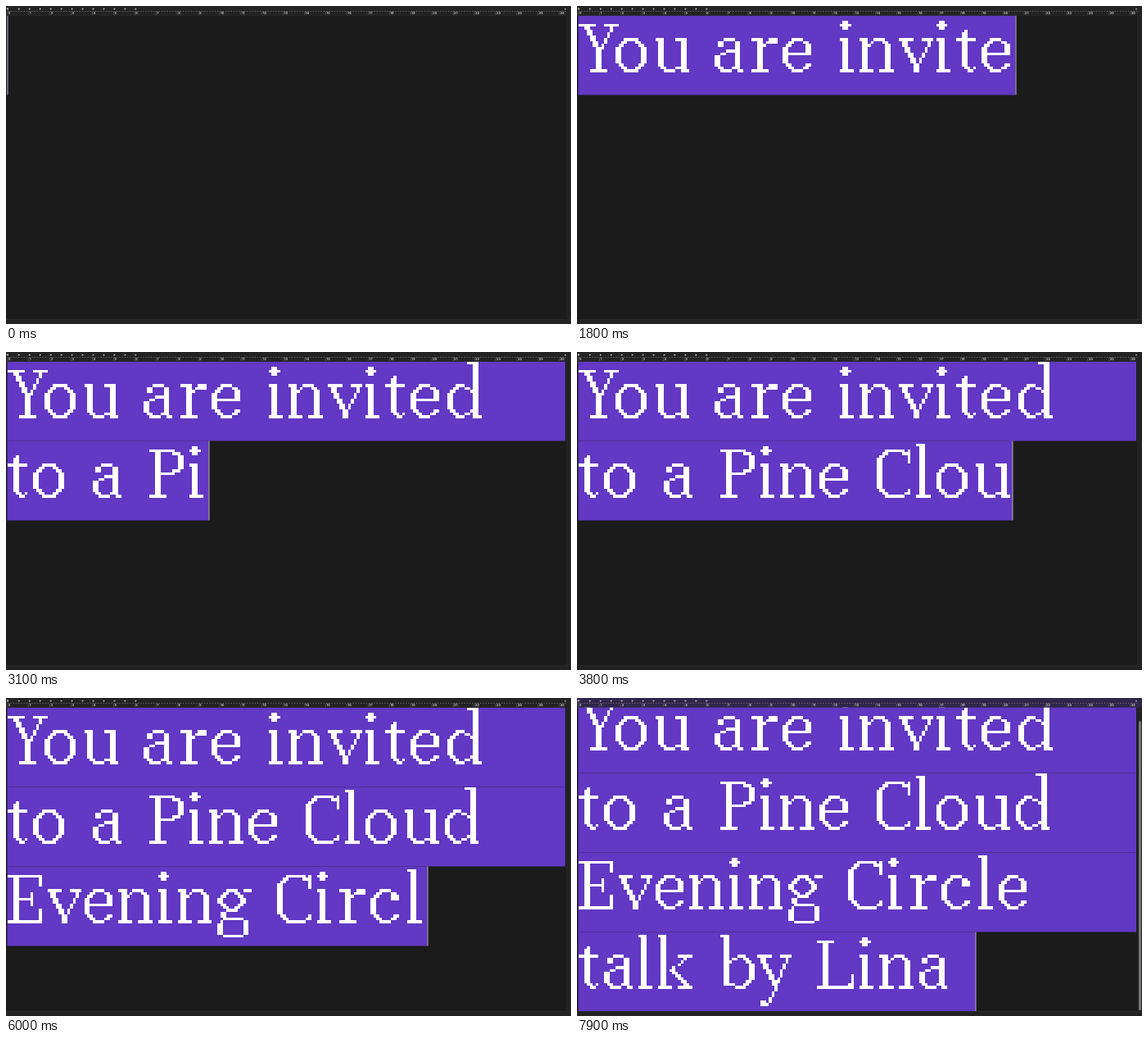
An HTML page with a canvas that plays this animation: 690x388 px, repeating every 8 s.

```html
<!DOCTYPE html>
<html lang="en">
<head>
<meta charset="utf-8">
<title>Invitation</title>
<style>
  html, body { margin: 0; width: 100%; height: 100%; overflow: hidden; background: #1b1b1b; }
  canvas { display: block; width: 690px; height: 388px; }
</style>
</head>
<body>
<canvas id="stage" width="690" height="388">You are invited to a Pine Cloud Evening Circle talk by Lina</canvas>
<script>
const ctx = document.getElementById('stage').getContext('2d');
const LOOP = 8000;
const CELL = 97 / 28;          // one font pixel
const LEFT = 2, TOP = 11.5, RIGHT = 683, BOTTOM = 382;
const LINE = 97, WRAP = 195;   // WRAP is in font pixels
const SCROLL = 17;

// Pen for the pixel font: baseline under row 19, x-height row 8, caps row 3
let cells = [];
const px = (x, y, w = 1, h = 1) => cells.push([x, y, w, h]);
const bar = (x, y, w) => px(x, y, w, 1);
const stem = (x, y0, y1) => px(x, y0, 2, y1 - y0 + 1);
const diag = (x0, y0, x1, y1, w) => {
  for (let y = y0; y <= y1; y++) bar(Math.round(x0 + (x1 - x0) * (y - y0) / (y1 - y0)), y, w);
};
const ring = (x, y, w, h, sides = 'lr') => {
  const last = y + h - 1;
  bar(x + 3, y, w - 6);
  bar(x + 3, last, w - 6);
  for (const side of sides) {
    const at = inset => side === 'l' ? x + inset : x + w - 2 - inset;
    for (const row of [y + 1, last - 1]) bar(at(2), row, 2);
    for (const row of [y + 2, last - 2]) bar(at(1), row, 2);
    stem(at(0), y + 3, last - 3);
  }
};
const tall = () => { bar(0, 1, 2); stem(1, 1, 18); };
const capStem = () => { stem(2, 3, 18); bar(0, 19, 6); };
const openRound = () => { ring(0, 8, 10, 12, 'l'); bar(7, 18, 2); bar(8, 17, 2); };

// letter: [advance, drawing]
const letters = {
  ' ': [8, () => {}],
  Y: [13, () => {
    bar(0, 3, 6); bar(9, 3, 5);
    diag(2, 4, 6, 11, 2); diag(11, 4, 8, 11, 1);
    stem(6, 11, 18); bar(4, 19, 6);
  }],
  P: [14, () => {
    bar(0, 3, 9); capStem();
    bar(8, 4, 3); stem(10, 5, 9); bar(8, 10, 3); bar(4, 11, 5);
  }],
  C: [14, () => {
    ring(0, 3, 13, 17, 'l');
    bar(9, 4, 3); px(11, 3, 1, 5); bar(10, 18, 2); bar(11, 17, 1);
  }],
  E: [14, () => {
    bar(0, 3, 12); capStem(); bar(0, 19, 12);
    bar(4, 11, 5); px(8, 9, 1, 5); px(11, 4, 1, 3); px(11, 15, 1, 4);
  }],
  L: [15, () => {
    bar(0, 3, 6); capStem(); bar(0, 19, 13);
    px(12, 15, 1, 4); bar(11, 18, 1);
  }],
  a: [12, () => {
    bar(3, 8, 4); px(1, 9, 2, 2); stem(7, 9, 18);
    bar(4, 12, 3); bar(2, 13, 2); stem(0, 14, 17);
    bar(1, 18, 2); bar(2, 19, 4); bar(6, 18, 1); bar(8, 19, 2);
  }],
  b: [13, () => {
    tall(); ring(3, 8, 9, 12, 'r');
    bar(3, 10, 1); bar(4, 9, 2); bar(3, 18, 2); bar(5, 19, 2);
  }],
  c: [13, () => { openRound(); bar(7, 9, 2); px(7, 10, 3, 2); }],
  d: [15, () => {
    ring(1, 8, 9, 12, 'l'); bar(7, 9, 2); bar(9, 10, 1);
    bar(7, 18, 2); bar(9, 17, 1);
    bar(8, 0, 2); stem(10, 0, 18); bar(10, 19, 3);
  }],
  e: [12, () => { openRound(); bar(7, 9, 2); px(8, 10, 2, 3); bar(2, 13, 8); }],
  g: [13, () => {
    ring(0, 8, 10, 8); bar(9, 8, 3);
    bar(1, 16, 2); bar(1, 17, 2); bar(2, 18, 7);
    bar(1, 19, 1); px(0, 20, 2, 4); px(9, 19, 2, 5); bar(2, 24, 7);
  }],
  i: [7, () => { px(1, 2, 2, 3); bar(0, 3, 4); bar(0, 8, 3); stem(1, 8, 18); bar(0, 19, 5); }],
  k: [14, () => {
    tall(); bar(0, 19, 5);
    bar(7, 8, 5); diag(9, 9, 4, 13, 1); diag(4, 13, 9, 18, 2); bar(7, 19, 5);
  }],
  l: [7, () => { tall(); bar(0, 19, 5); }],
  n: [14, () => {
    bar(0, 8, 3); stem(1, 8, 18); bar(0, 19, 5);
    bar(3, 10, 1); bar(4, 9, 1); bar(5, 8, 4);
    bar(8, 9, 2); stem(9, 10, 18); bar(7, 19, 5);
  }],
  o: [13, () => ring(0, 8, 11, 12)],
  r: [12, () => {
    bar(1, 8, 3); stem(3, 8, 18); bar(1, 19, 6);
    bar(5, 10, 1); bar(6, 9, 1); px(7, 8, 3, 2);
  }],
  t: [9, () => { bar(3, 5, 1); stem(2, 6, 17); bar(0, 8, 7); bar(3, 18, 2); bar(4, 19, 2); bar(6, 18, 1); }],
  u: [14, () => {
    bar(1, 8, 3); stem(2, 8, 17); bar(3, 18, 2); bar(4, 19, 4);
    bar(8, 18, 2); bar(8, 8, 2); stem(10, 8, 19); bar(12, 19, 1);
  }],
  v: [13, () => { bar(0, 8, 5); bar(8, 8, 4); diag(1, 9, 5, 18, 2); diag(10, 9, 6, 18, 1); bar(5, 19, 2); }],
  y: [13, () => {
    bar(0, 8, 5); bar(8, 8, 4);
    diag(1, 9, 5, 18, 2); diag(10, 9, 4, 24, 1); bar(1, 24, 2); bar(1, 25, 3);
  }]
};
const font = {};
for (const [name, [advance, sketch]] of Object.entries(letters)) {
  cells = [];
  sketch();
  font[name] = { advance, cells };
}

// Each run starts at a time; keys follow every 100 ms, an empty key is a pause
const runs = [
  [300, 'Y|o|u '],
  [800, 'a|r|e '],
  [1300, 'i|n|v|i|t|e'],
  [2000, 'd| |t|o| ||a'],
  [2900, ' |P|i|n|e| |C|l|o|u|d| '],
  [4400, 'E|v||e||n|i|n|g| '],
  [5600, 'C|i|r|c|l|e| '],
  [6400, 't|a|l|k| ||b|y| '],
  [7400, 'L|i|n|a| ']
];
const keys = runs.flatMap(([start, text]) =>
  text.split('|').map((key, i) => ({ time: start + i * 100, key })));
const fullWidthAt = [2500, 5500, 6900];

const typed = t => keys.filter(k => k.time <= t).map(k => k.key).join('');
const width = text => [...text].reduce((sum, ch) => sum + font[ch].advance, 0);

function wrap(text) {
  const lines = [''];
  for (const word of text.match(/\S+ ?/g) || []) {
    const last = lines.length - 1;
    if (lines[last] && width(lines[last] + word.trim()) > WRAP) lines.push(word);
    else lines[last] += word;
  }
  return lines;
}

function rect(color, x, y, w, h) {
  ctx.fillStyle = color;
  ctx.fillRect(x, y, w, h);
}

function drawLine(text, y) {
  const snapX = v => Math.round(LEFT + v * CELL);
  const snapY = v => Math.round(y + v * CELL);
  let pen = 0;
  ctx.fillStyle = '#fff';
  for (const ch of text) {
    for (const [x, row, w, h] of font[ch].cells) {
      const l = snapX(pen + x), top = snapY(row);
      ctx.fillRect(l, top, snapX(pen + x + w) - l, snapY(row + h) - top);
    }
    pen += font[ch].advance;
  }
}

function triangle(x, y, dx, dy) {
  ctx.beginPath();
  ctx.moveTo(x - dy, y - dx);
  ctx.lineTo(x + dy, y + dx);
  ctx.lineTo(x + dx * 2, y + dy * 2);
  ctx.fill();
}

function drawRuler(tinted) {
  rect(tinted ? '#30264a' : '#232323', 0, 0, 690, 11);
  rect(tinted ? '#45366a' : '#303030', 0, 11, 690, 0.5);
  for (let x = 2; x < RIGHT; x += 3.24) rect('#777', x, 6, 1.6, 0.7);
  ctx.font = 'bold 4px Inter, sans-serif';
  for (let n = 0; n <= 26; n++) {
    const x = 2 + n * 25.92;
    rect('#666', x - 0.5, 7, 0.6, 4);
    ctx.fillStyle = '#c4c4c4';
    ctx.fillText(n, x + 0.8, 10.3);
  }
  ctx.fillStyle = '#ccc';
  triangle(2, 2.5, 0, 1.4);
  for (let k = 1; k <= 12; k++) triangle(2 + k * 12.96, 3.6, 1.2, 0);
  triangle(683, 3, 0, 1);
}

function draw(t) {
  const lines = wrap(typed(t));
  const scrolled = lines.length > 3;
  const top = TOP - (scrolled ? SCROLL : 0);

  rect('#1b1b1b', 0, 0, 690, 388);
  ctx.save();
  ctx.beginPath();
  ctx.rect(0, TOP, RIGHT + 1, BOTTOM - TOP);
  ctx.clip();
  lines.forEach((text, i) => {
    const y = top + i * LINE;
    const isLast = i === lines.length - 1;
    const end = !isLast && t >= fullWidthAt[i] ? RIGHT : LEFT + width(text) * CELL;
    rect('#6238c4', 1.5, y, end - 1.5, LINE);
    drawLine(text, y);
    if (isLast) rect('#b4b4b4', Math.round(end) - 0.5, y, 1, LINE);
  });
  ctx.restore();

  drawRuler(scrolled);
  rect('#232323', 684, 11.5, 6, 371);
  rect('#232223', 0, BOTTOM, 690, 6);
  rect('#302c2e', 0, BOTTOM, 690, 0.6);
  if (scrolled) {
    ctx.fillStyle = '#777';
    ctx.beginPath();
    ctx.roundRect(686, 28, 3, 353, 1.5);
    ctx.fill();
  }
}

const start = performance.now();
function tick() {
  draw((performance.now() - start) % LOOP);
  requestAnimationFrame(tick);
}
tick();
</script>
</body>
</html>
```
